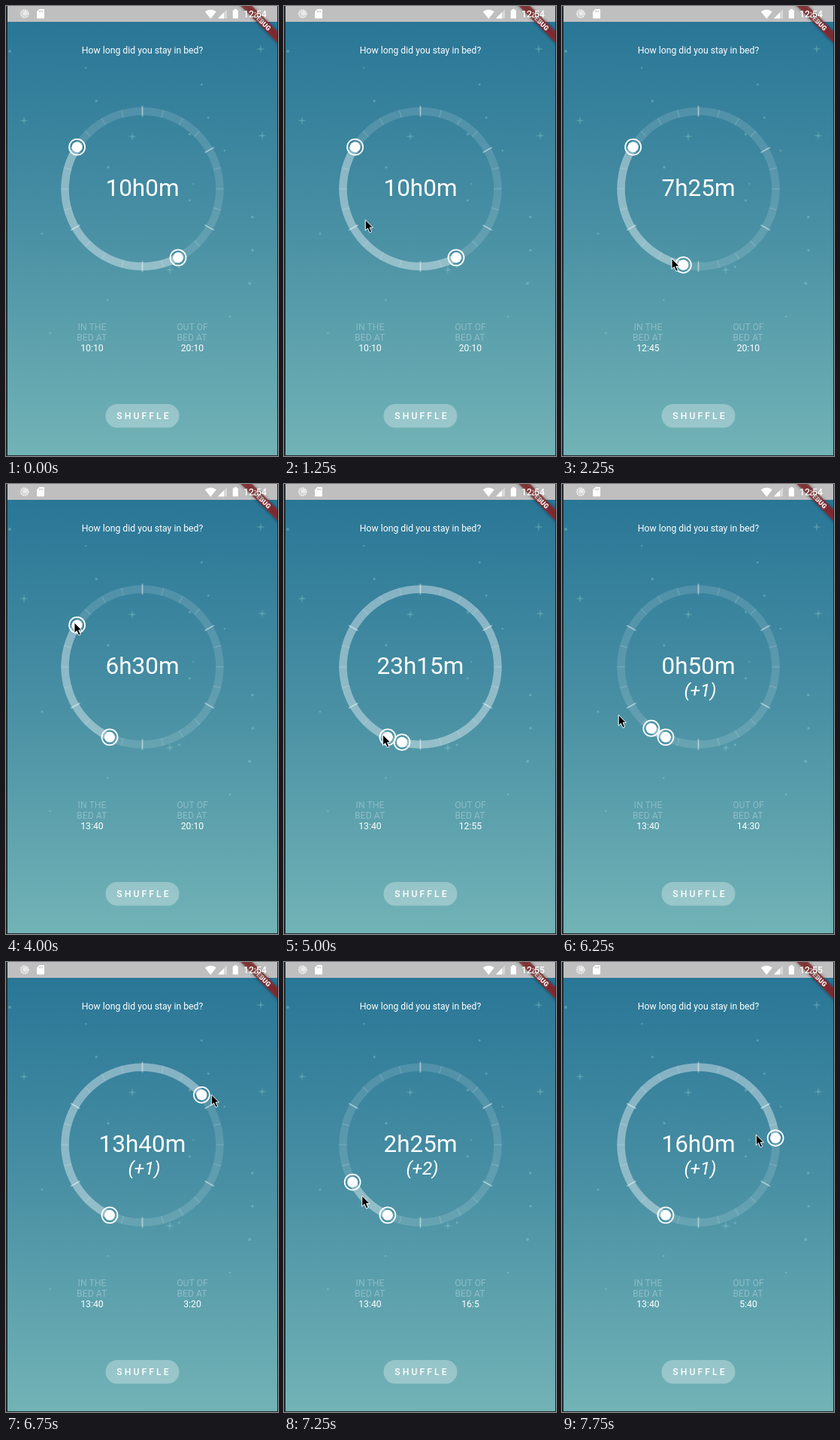
Write an HTML page that moves like this. It is 362 px wide and 597 px high and loops after 8000 ms.

```html
<!DOCTYPE html>
<html lang="en">
<head>
<meta charset="utf-8">
<title>Sleep dial</title>
<style>
  html, body { margin: 0; width: 100%; height: 100%; overflow: hidden; background: #222; }
  svg { display: block; width: 362px; height: 597px; }
  text { font: 12.25px Roboto, sans-serif; fill: #fff; text-anchor: middle; }
  .faint { fill-opacity: .3; }
  .medium { font-weight: 500; }
  #total { font-size: 31.5px; }
  #laps { font-size: 24.5px; font-style: italic; }
  .debug { font-size: 8.9px; font-weight: 900; }
  .ring { fill: none; stroke: #fff; }
</style>
</head>
<body>
<svg viewBox="0 0 362 597">
  <defs>
    <linearGradient id="sky" x2="0" y2="1">
      <stop offset="0" stop-color="#277495"/>
      <stop offset=".5" stop-color="#4990a4"/>
      <stop offset="1" stop-color="#72b3b6"/>
    </linearGradient>
    <filter id="soft" x="-20%" y="-100%" width="140%" height="300%">
      <feGaussianBlur stdDeviation="2"/>
    </filter>
    <g id="handle">
      <circle r="7" fill="#fff"/>
      <circle r="10.5" fill="none" stroke="#fff" stroke-width="1.75"/>
    </g>
  </defs>

  <rect width="362" height="597" fill="url(#sky)"/>
  <g id="stars" fill="#a5dcd5" opacity=".33"></g>

  <text x="181.5" y="63.3">How long did you stay in bed?</text>

  <g transform="translate(181.5 242.5)">
    <circle class="ring" r="103" stroke-width="10.5" stroke-opacity=".13"/>
    <g id="sectors"></g>
    <circle id="span" class="ring" r="103" stroke-width="10.5" stroke-opacity=".3" pathLength="1440"/>
    <use id="start" href="#handle"/>
    <use id="end" href="#handle"/>
  </g>
  <text id="total" x="181.5" y="251.5"></text>
  <text id="laps" x="184" y="281.7"></text>

  <text class="faint" x="114.5" y="430">IN THE</text>
  <text class="faint" x="114.2" y="444">BED AT</text>
  <text id="inTime" x="114.5" y="458"></text>
  <text class="faint" x="248" y="430">OUT OF</text>
  <text class="faint" x="247.5" y="444">BED AT</text>
  <text id="outTime" x="248" y="458"></text>

  <rect x="132.5" y="528" width="98" height="31.5" rx="15.75" fill="#fff" fill-opacity=".3"/>
  <text class="medium" x="182" y="548.4">S H U F F L E</text>

  <!-- status bar and corner ribbon -->
  <rect width="362" height="21" fill="#fff"/>
  <g transform="translate(341 21) rotate(45)">
    <rect x="-40" y="-5.3" width="80" height="10.6" opacity=".45" filter="url(#soft)"/>
    <rect x="-40" y="-5.3" width="80" height="10.6" fill="#b71c1c" fill-opacity=".63"/>
    <text class="debug" y="3.2">DEBUG</text>
  </g>
  <rect width="362" height="21" fill-opacity=".25"/>
  <g fill="#fff">
    <circle cx="24.8" cy="10.3" r="5.2" fill-opacity=".35" stroke="#fff" stroke-opacity=".75" stroke-width="1.4" stroke-dasharray="2 1"/>
    <circle cx="25.6" cy="9.6" r="3" fill-opacity=".5"/>
    <path d="M44.5 4H50a1 1 0 0 1 1 1V15.5a1 1 0 0 1-1 1H42a1 1 0 0 1-1-1V7.5Z"/>
    <path d="M44.4 6v2.4M46.4 6v2.4M48.4 6v2.4" stroke="#bfbfbf"/>
    <path d="M264.8 7.6Q272.3 2 279.8 7.6L272.3 17Z"/>
    <path d="M294 4.5V16.5H282Z" fill-opacity=".4"/>
    <path d="M290 8.5V16.5H282Z"/>
    <path d="M304 4h3v1.4h2V16.6h-7.2V5.4H304Z"/>
  </g>
  <text id="clock" class="medium" x="331.5" y="15"></text>

  <!-- window edges -->
  <path d="M0 0H2V596H361V0H362V597H0Z" fill="#222a2e"/>
  <path id="cursor" d="M0 0V14.2L3.2 11.2L5.8 17L8.4 15.9L5.9 10.3H10.2Z" stroke="#fff"/>
</svg>

<script>
const LOOP = 8000, STEP = 250, DAY = 1440, RADIUS = 103, CX = 181.5, CY = 242.5;
const $ = id => document.getElementById(id);

function add(parent, tag, attrs) {
  const node = document.createElementNS('http://www.w3.org/2000/svg', tag);
  for (const key in attrs) node.setAttribute(key, attrs[key]);
  $(parent).append(node);
}

let seed = 7;
const random = () => (seed = seed * 16807 % 2147483647) / 2147483647;
for (let i = 0; i < 18; i++)
  add('stars', 'circle', { cx: 5 + random() * 350, cy: 60 + i * 22, r: 1 + random() });

for (const [x, y] of [[339, 57], [24, 152], [341, 172], [168, 173], [218, 350]])
  add('stars', 'path', { d: `M${x} ${y - 6}l1 5 5 1-5 1-1 5-1-5-5-1 5-1z` });

function addSectors(count, reach, alpha) {
  for (let i = 0; i < count; i++) add('sectors', 'path', {
    class: 'ring', d: `M0 ${-RADIUS - reach}V${-RADIUS + reach}`,
    'stroke-width': 1.75, 'stroke-opacity': alpha, transform: `rotate(${i * 360 / count})`
  });
}
addSectors(6, 7.2, .4);
addSectors(24, 5.3, .12);

// Key points: time, then values. Minutes and degrees run on through the laps.
const bedKeys = [[2000, 610], [2250, 765], [2500, 820]];
const wakeKeys = [[4000, 1210], [5000, 2215], [6250, 2310], [7250, 3845], [7750, 3220]];
const pointerKeys = [ // angle, distance from the dial centre
  [1000, 283, 77], [1750, 156, 98], [2000, 156, 98], [2250, 201, 99], [2500, 207, 99],
  [2750, 207, 99], [3500, 268, 96], [4000, 303, 108], [5000, 569, 103],
  [6250, 599, 124], [7250, 949, 103], [7750, 800, 78]
];

function sample(keys, t) {
  const next = keys.findIndex(k => k[0] > t);
  if (next <= 0) return keys.at(next).slice(1);
  const a = keys[next - 1], b = keys[next], p = (t - a[0]) / (b[0] - a[0]);
  return a.slice(1).map((v, i) => v + (b[i + 1] - v) * p);
}

const minutes = (keys, t) => Math.round(sample(keys, t)[0] / 5) * 5;
const hour = m => Math.floor(m % DAY / 60);
const clockText = m => `${hour(m)}:${m % 60}`;

function place(id, degrees, radius, x = 0, y = 0) {
  const a = degrees * Math.PI / 180;
  $(id).setAttribute('transform',
    `translate(${x + radius * Math.sin(a)} ${y - radius * Math.cos(a)})`);
}

function draw(t) {
  const bed = minutes(bedKeys, t), wake = minutes(wakeKeys, t);
  const length = wake - bed, laps = Math.floor(length / DAY);
  place('start', bed / 4, RADIUS);
  place('end', wake / 4, RADIUS);
  $('span').setAttribute('stroke-dasharray', `${length % DAY} ${DAY}`);
  $('span').setAttribute('transform', `rotate(${bed / 4 - 90})`);
  $('total').textContent = `${hour(length)}h${length % 60}m`;
  $('laps').textContent = laps ? `(+${laps})` : '';
  $('inTime').textContent = clockText(bed);
  $('outTime').textContent = clockText(wake);
  $('clock').textContent = t < 7000 ? '12:54' : '12:55';
  $('cursor').setAttribute('visibility', t < pointerKeys[0][0] ? 'hidden' : 'visible');
  place('cursor', ...sample(pointerKeys, t), CX, CY);
}

// The picture holds for each step
let shown = -1;
function tick() {
  const t = Math.floor(performance.now() % LOOP / STEP) * STEP;
  if (t !== shown) draw(shown = t);
  requestAnimationFrame(tick);
}
tick();
</script>
</body>
</html>
```
